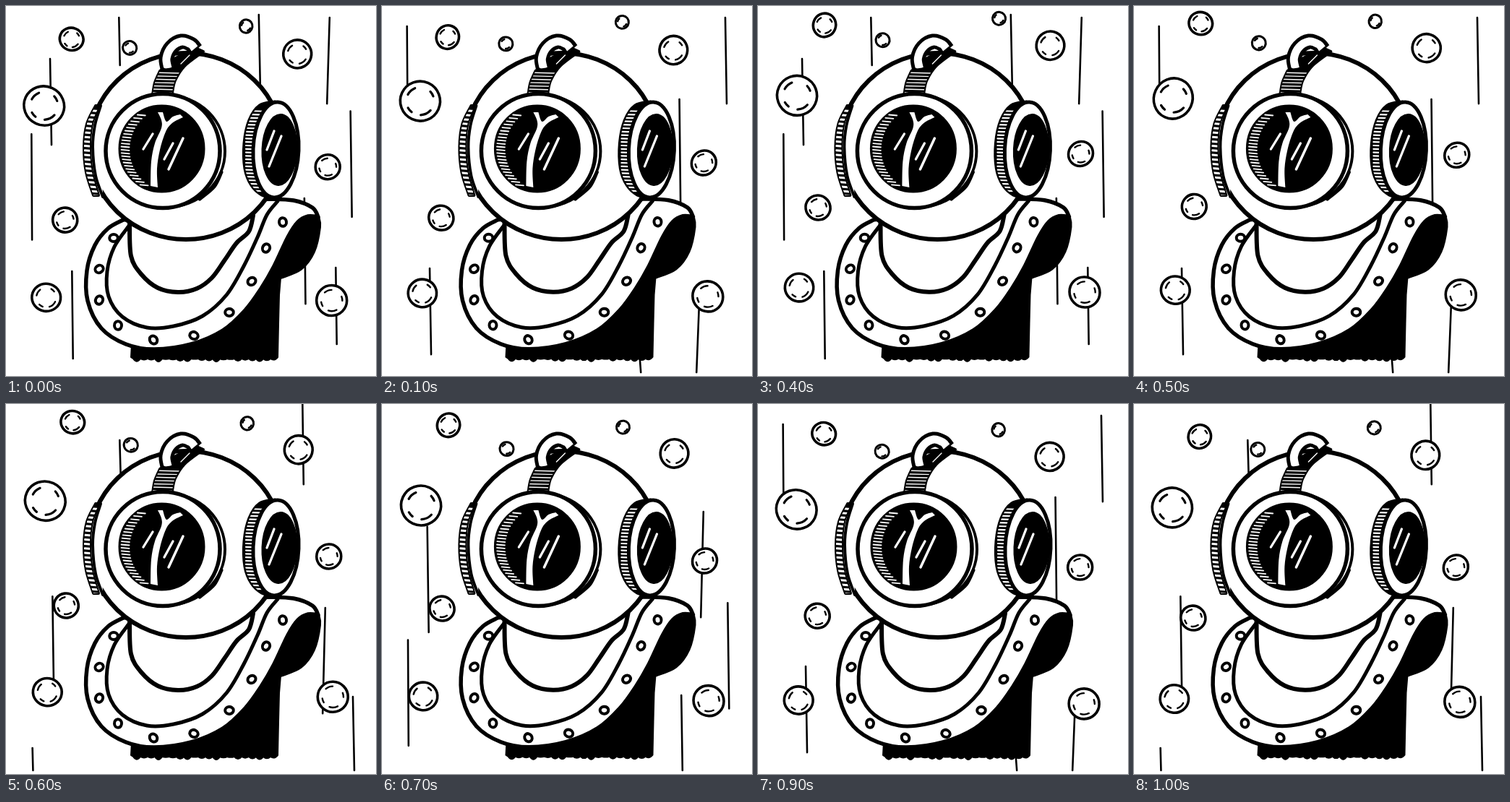
Write an HTML page with a canvas that moves like this. It is 512x512 px and loops after 1100 ms.

```html
<!DOCTYPE html>
<html lang="en">
<head>
<meta charset="utf-8">
<title>Diving helmet</title>
<style>
html, body { margin: 0; width: 100%; height: 100%; overflow: hidden; background: #fff; }
canvas { display: block; width: 100vw; height: 100vh; }
</style>
</head>
<body>
<canvas id="stage"></canvas>
<script>
const STEP = 100, STEPS = 11, RISE = 4, SIZE = 512;
const canvas = document.getElementById('stage');
const ratio = Math.max(1, window.devicePixelRatio || 1);
canvas.width = canvas.height = SIZE * ratio;
const c = canvas.getContext('2d');

// Strokes rise in four steps: x and top on entry, x and top on leaving, phase of entry
const columns = [
  { from: [37, 476], to: [35, 28], first: 2 },
  { from: [67, 363], to: [62, 73], first: 1 },
  { from: [357, 475], to: [351, 12], first: 1 },
  { from: [415, 403], to: [411, -8], first: 3 },
  { from: [437, 415], to: [446, 16], first: 1 },
  { from: [481, 405], to: [476, 16], first: 2 }
];
// Strokes that show for one step only
const flicks = [
  { x: 157, top: 16, len: 66, at: 0 },
  { x: 92, top: 367, len: 121, at: 0 },
  { x: 457, top: 362, len: 106, at: 0 },
  { x: 158, top: 50, len: 50, at: 2 }
];

// Each bubble bobs around y and is highest at step "peak"
const bubbles = [
  { x: 91.5, y: 35, r: 16, bob: 11, peak: 5.2 },
  { x: 172, y: 56, r: 9.5, bob: 10, peak: 3.1 },
  { x: 333, y: 26, r: 9, bob: 10, peak: 3.1 },
  { x: 404, y: 63.5, r: 19.5, bob: 9.5, peak: 3.3 },
  { x: 53.5, y: 134.5, r: 27.5, bob: 11.5, peak: 3.3 },
  { x: 446, y: 215.5, r: 17, bob: 11, peak: 4 },
  { x: 82.5, y: 287, r: 17, bob: 9.5, peak: 5 },
  { x: 56.5, y: 399.5, r: 19.5, bob: 10.5, peak: 3.4 },
  { x: 451.5, y: 405, r: 21, bob: 10, peak: 3.2 }
];

const mix = (a, b, t) => a + (b - a) * t;
const noise = n => { const v = Math.sin(n * 12.9898) * 43758.5453; return v - Math.floor(v); };

// Smooth curve through a flat list of points
function curve(p, join) {
  const n = p.length / 2;
  const at = i => { i = Math.max(0, Math.min(n - 1, i)); return [p[2 * i], p[2 * i + 1]]; };
  join ? c.lineTo(p[0], p[1]) : c.moveTo(p[0], p[1]);
  for (let i = 0; i < n - 1; i++) {
    const [a, b, d, e] = [at(i - 1), at(i), at(i + 1), at(i + 2)];
    c.bezierCurveTo(b[0] + (d[0] - a[0]) / 6, b[1] + (d[1] - a[1]) / 6,
                    d[0] - (e[0] - b[0]) / 6, d[1] - (e[1] - b[1]) / 6, d[0], d[1]);
  }
}

function paint(width, fill, color = '#000') {
  if (fill) { c.fillStyle = fill; c.fill(); }
  if (width) { c.lineWidth = width; c.strokeStyle = color; c.stroke(); }
}

function line(p, width, color) {
  c.beginPath(); curve(p); paint(width, null, color);
}

function oval(x, y, rx, ry, width, fill, tilt = 0) {
  c.beginPath(); c.ellipse(x, y, rx, ry, tilt, 0, 7); paint(width, fill);
}

// White rungs inside the current path
function rungs(x0, x1, y0, y1, gap, width, slope) {
  c.save(); c.clip();
  c.beginPath();
  for (let y = y0; y < y1; y += gap) { c.moveTo(x0, y); c.lineTo(x1, y + slope); }
  paint(width, null, '#fff');
  c.restore();
}

function streak(x, top, bottom, lean) {
  line([x - lean, top, x, mix(top, bottom, .5), x + lean, bottom], 2.6);
}

function drawStreaks(k) {
  for (const { from, to, first } of columns) {
    const n = (k + RISE - first) % RISE, t = n / (RISE - 1);
    const top = mix(from[1], to[1], t);
    const len = 100 + 50 * Math.sin(Math.PI * (n + .5) / RISE);
    streak(mix(from[0], to[0], t), top, Math.min(507, top + len), (from[0] - to[0]) / 5);
  }
  for (const f of flicks)
    if (f.at === k % RISE) streak(f.x, f.top, f.top + f.len, .7);
}

function drawBubble(b, i, k) {
  const turn = Math.PI * 2 / STEPS;
  const x = b.x - Math.cos(k * turn) * .8;
  const y = b.y - b.bob * Math.cos((k - b.peak) * turn);
  const squash = (noise(i * 7 + k % 3) - .5) * .06, spin = noise(i + 5) * .8;
  oval(x, y, b.r * (1 - squash), b.r * (1 + squash), b.r > 15 ? 3.6 : 3, '#fff', spin);
  const glints = [[3.2, 3.9], [.3, 1.1], [5.1, 5.5], [1.8, 2.2]];
  for (const [from, to] of glints.slice(0, b.r > 12 ? 4 : 2)) {
    c.beginPath(); c.arc(x, y, b.r * .7, from + spin, to + spin);
    paint(b.r > 25 ? 3.2 : 2.4);
  }
}

function drawCollar() {
  const flap = [432, 291, 434, 306, 426, 340, 408, 364, 380, 376];
  // shadowed back and torso
  c.beginPath();
  curve(flap);
  curve([378, 400, 377, 440, 376, 486], true);
  for (let x = 376; x > 180; x -= 10)
    c.quadraticCurveTo(x - 5, 489 + noise(x) * 7, x - 10, 488);
  c.lineTo(173, 486); c.lineTo(174, 468); c.lineTo(300, 440); c.lineTo(395, 300);
  c.closePath(); paint(2, '#000');

  c.beginPath();
  curve([162, 296, 141, 308, 123, 331, 112, 366, 113, 408, 132, 446, 166, 468, 205, 475,
         256, 468, 300, 449, 331, 421, 353, 391, 371, 360, 390, 320, 404, 299, 418, 291, 432, 292]);
  curve([432, 292, 424, 279, 398, 269, 362, 267], true);
  c.lineTo(300, 280); c.closePath(); paint(5.5, '#fff');
  line(flap, 4);

  line([171, 303, 150, 333, 140, 367, 142, 402, 161, 430, 195, 445, 232, 443,
        272, 429, 305, 400, 329, 360, 348, 320, 361, 289, 376, 270], 5);
  line([171, 300, 173, 346, 187, 371, 210, 390, 238, 396, 264, 391, 285, 376,
        303, 351, 319, 328, 336, 312, 342, 290], 6);

  const rivets = [149, 321, 129, 364, 129, 407, 155, 442, 204, 462, 260, 456, 309, 424, 340, 381, 360, 335, 383, 299];
  for (let i = 0; i < rivets.length; i += 2)
    oval(rivets[i], rivets[i + 1], 5.8, 5, 4, '#fff', i * 1.3);
}

function drawLeftPort() {
  const outer = [124, 138, 112, 163, 108, 195, 111, 230, 121, 262];
  const seam = [131, 138, 123, 165, 120, 195, 124, 235, 134, 264];
  c.beginPath();
  curve(outer);
  c.lineTo(134, 264);
  c.lineTo(131, 138);
  paint(0, '#fff');
  c.beginPath();
  curve(outer);
  curve([128, 262, 119, 230, 116, 195, 119, 163, 129, 138], true);
  c.closePath(); paint(4, '#000');
  rungs(109, 128, 144, 262, 6.2, 3, 1.5);
  line(seam, 4);
}

function drawCrown() {
  c.beginPath();
  curve([213, 90, 206, 106, 203, 123]);
  curve([230, 120, 234, 103, 247, 83, 273, 63], true);
  c.lineTo(262, 58); c.lineTo(235, 72);
  c.closePath(); paint(4, '#000');
  rungs(200, 240, 92, 122, 4.6, 1.4, 1);
  line([254, 68, 242, 80], 1.4, '#fff');
  const tube = [224, 86, 222, 72, 229, 57, 243, 49, 256, 53, 263, 61];
  c.lineCap = 'butt';
  line(tube, 21);
  line(tube.slice(0, -2).concat(261, 59), 11, '#fff');
  c.lineCap = 'round';
  line([218, 87, 224, 89, 230, 86], 3);
}

function drawWindow() {
  oval(224, 201, 79, 77, 4, '#fff');
  line([298, 230, 288, 250, 268, 267], 5);
  oval(217, 200.5, 79, 79, 5.5, '#fff');
  const x = 215.5, y = 197.5, rx = 59, ry = 60;
  oval(x, y, rx, ry, 2, '#000');
  // ribbed inner wall
  c.beginPath();
  for (let d = -47; d < 50; d += 4.4) {
    const edge = x - rx * Math.sqrt(1 - (d / ry) ** 2);
    c.moveTo(edge + 3, y + d); c.lineTo(edge + 14, y + d + 1);
  }
  paint(1.8, null, '#fff');

  // curved reflection
  c.beginPath();
  curve([210, 147, 215, 158, 215, 169, 206, 190, 201, 215, 200, 249]);
  curve([210, 251, 209, 225, 213, 199, 221, 174, 230, 162, 245, 154], true);
  curve([241, 150, 231, 153, 222, 160, 217, 147], true);
  c.closePath(); paint(0, '#fff');
  line([203, 177, 190, 198], 3.3, '#fff');
  line([231, 190, 219, 212], 3.3, '#fff');
  line([245, 183, 225, 226], 3.5, '#fff');
}

function drawRightPort() {
  c.beginPath();
  curve([372, 133, 351, 138, 337, 158, 330, 190, 331, 225, 340, 248, 354, 261, 370, 265]);
  c.closePath(); paint(5, '#000');
  rungs(332, 366, 145, 256, 4.8, 2.2, 1);
  oval(373.5, 199, 31.5, 66, 5, '#fff', .04);
  oval(378.5, 199, 24, 49, 2, '#000', .04);
  line([371, 173, 361, 199], 3.3, '#fff');
  line([381, 180, 364, 222], 3.3, '#fff');
}

function drawHelmet() {
  oval(249, 194, 134, 129, 6, '#fff');
  drawLeftPort();
  drawCrown();
  drawWindow();
  drawRightPort();
}

function shifted(x, y, draw) {
  c.save(); c.translate(x, y); draw(); c.restore();
}

function render(k) {
  c.setTransform(ratio, 0, 0, ratio, 0, 0);
  c.fillStyle = '#fff';
  c.fillRect(0, 0, SIZE, SIZE);
  c.lineCap = c.lineJoin = 'round';
  drawStreaks(k);
  bubbles.forEach((b, i) => drawBubble(b, i, k));
  // the drawing jitters on a three-step cycle
  const rest = k % 3 === 0;
  shifted(rest ? 0 : -1.5, rest ? 0 : -.3, drawCollar);
  shifted(rest ? 0 : -.6, 0, drawHelmet);
}

const start = performance.now();
function tick() {
  render(Math.floor((performance.now() - start) / STEP) % STEPS);
  requestAnimationFrame(tick);
}
tick();
</script>
</body>
</html>
```
